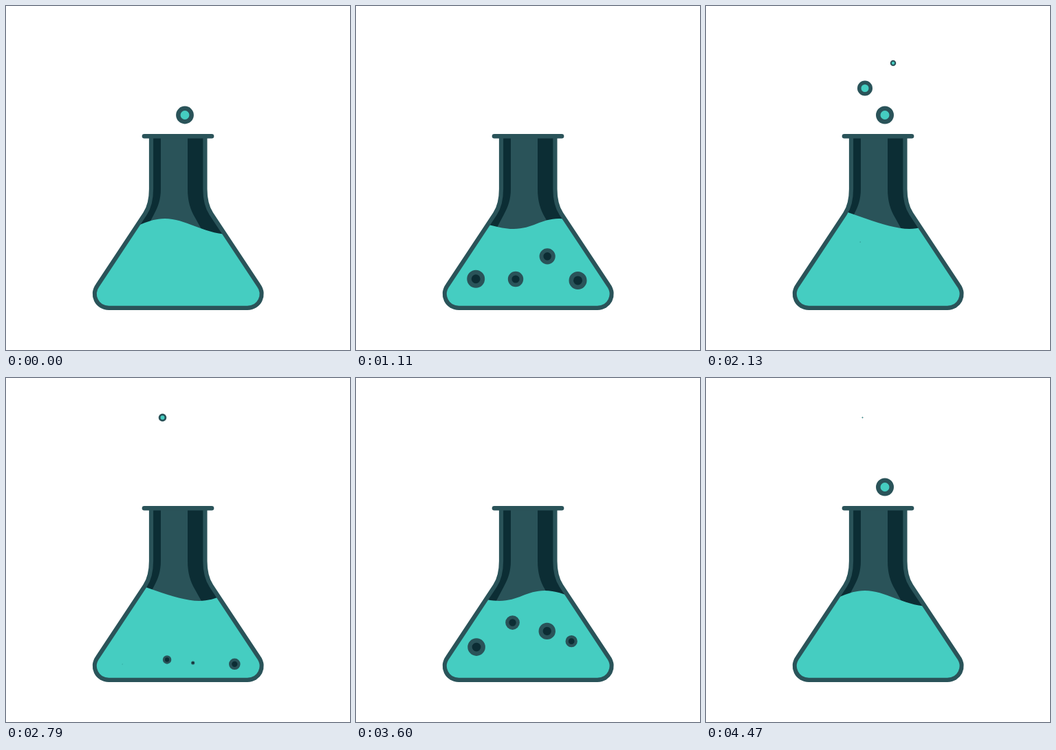
Animation of 500x500 px, one loop 4.5 s. Source, as an HTML page:

```html
<!DOCTYPE html>
<html lang="en">
<head>
<meta charset="utf-8">
<title>Bubbling flask</title>
<style>
  html, body { margin: 0; width: 100%; height: 100%; overflow: hidden; background: #fff; }
  svg { display: block; width: 100%; height: 100%; }
</style>
</head>
<body>
<svg viewBox="0 0 500 500" xmlns="http://www.w3.org/2000/svg">
  <defs>
    <path id="body" d="M211 189V266C211 282 208 293 202 302L133.1 406C123 420 132 438.8 149.5 438.8H350.9C368.4 438.8 377.4 420 367.3 406L298.4 302C292.4 293 289.4 282 289.4 266V189Z"/>
    <clipPath id="inside"><use href="#body"/></clipPath>
  </defs>
  <g clip-path="url(#inside)">
    <rect x="120" y="180" width="260" height="270" fill="#2a5359"/>
    <g fill="#0c2d34">
      <path d="M190 189H225V266C225 281 221 292 215 303L198 335H150Z"/>
      <path d="M330 189H264V266C264 284 268 296 275 308L290 335H350Z"/>
    </g>
    <path id="liquid" fill="#45cdc1"/>
  </g>
  <g id="bubbles" stroke="#2a5359" stroke-width="6.5"></g>
  <use href="#body" fill="none" stroke="#2a5359" stroke-width="6.2" stroke-linejoin="round"/>
  <path d="M201 189.2H299" stroke="#2a5359" stroke-width="6.6" stroke-linecap="round"/>
</svg>
<script>
const LOOP = 4500;
const liquid = document.getElementById('liquid');
const layer = document.getElementById('bubbles');

// Each group shares its colour and the lifetime of its first and second round.
// A spot is where a bubble starts, how far it drifts, and when each round begins.
const groups = [
  {
    fill: '#0c2d34', lives: [1550, 1480],
    spots: [
      { x: 169, y: 416, dx: 11, dy: -42, at: [374, 2780] },
      { x: 236, y: 413, dx: -12, dy: -70, at: [598, 2555] },
      { x: 271, y: 414.5, dx: 11, dy: -68, at: [103, 2697] },
      { x: 340, y: 420, dx: -35, dy: -42, at: [335, 2465] }
    ]
  },
  {
    fill: '#45cdc1', lives: [740, 614],
    spots: [
      { x: 260, y: 158.5, at: [1760, 4170] },
      { x: 231, y: 119.5, at: [5, 1933] },
      { x: 272, y: 83, at: [2052] },
      { x: 227.5, y: 57.5, at: [2160, 3872] }
    ]
  }
];

function makeBubble(fill) {
  const el = document.createElementNS('http://www.w3.org/2000/svg', 'circle');
  el.setAttribute('r', 9.75);
  el.setAttribute('fill', fill);
  return layer.appendChild(el);
}

const bubbles = groups.flatMap(({ fill, lives, spots }) =>
  spots.flatMap(({ at, ...spot }) =>
    at.map((start, round) => ({ dx: 0, dy: 0, ...spot, start, life: lives[round], el: makeBubble(fill) }))));

// Same curve as cubic-bezier(.42, 0, .58, 1)
function ease(p) {
  let lo = 0, hi = 1;
  for (let i = 0; i < 22; i++) {
    const s = (lo + hi) / 2, r = 1 - s;
    if (1.26 * s * r * r + 1.74 * s * s * r + s * s * s < p) lo = s;
    else hi = s;
  }
  return lo * lo * (3 - 2 * lo);
}

// The wave slides right and back; x is its trough.
function drawLiquid(t) {
  const x = 164.8 + 131.7 * ease(1 - Math.abs(1 - 2 * t / LOOP));
  liquid.setAttribute('d',
    `M${x - 200} 450V278L${x - 130} 288` +
    `C${x - 90} 296 ${x - 36} 324 ${x} 324` +
    `C${x + 27} 324 ${x + 40} 309 ${x + 66} 309` +
    `C${x + 96} 309 ${x + 120} 330 ${x + 158} 332` +
    `L${x + 260} 332V450Z`);
}

function drawBubble({ el, start, life, x, y, dx, dy }, t) {
  const p = (t - start + LOOP) % LOOP / life;
  const shown = p > 0 && p < 1;
  el.style.display = shown ? '' : 'none';
  if (!shown) return;
  const size = Math.sin(Math.PI * p);
  el.setAttribute('transform', `translate(${x + dx * p} ${y + dy * ease(p)}) scale(${size})`);
}

function draw(t) {
  drawLiquid(t);
  bubbles.forEach(b => drawBubble(b, t));
}

const begin = performance.now();
function tick() {
  draw((performance.now() - begin) % LOOP);
  requestAnimationFrame(tick);
}
draw(0);
requestAnimationFrame(tick);
</script>
</body>
</html>
```
